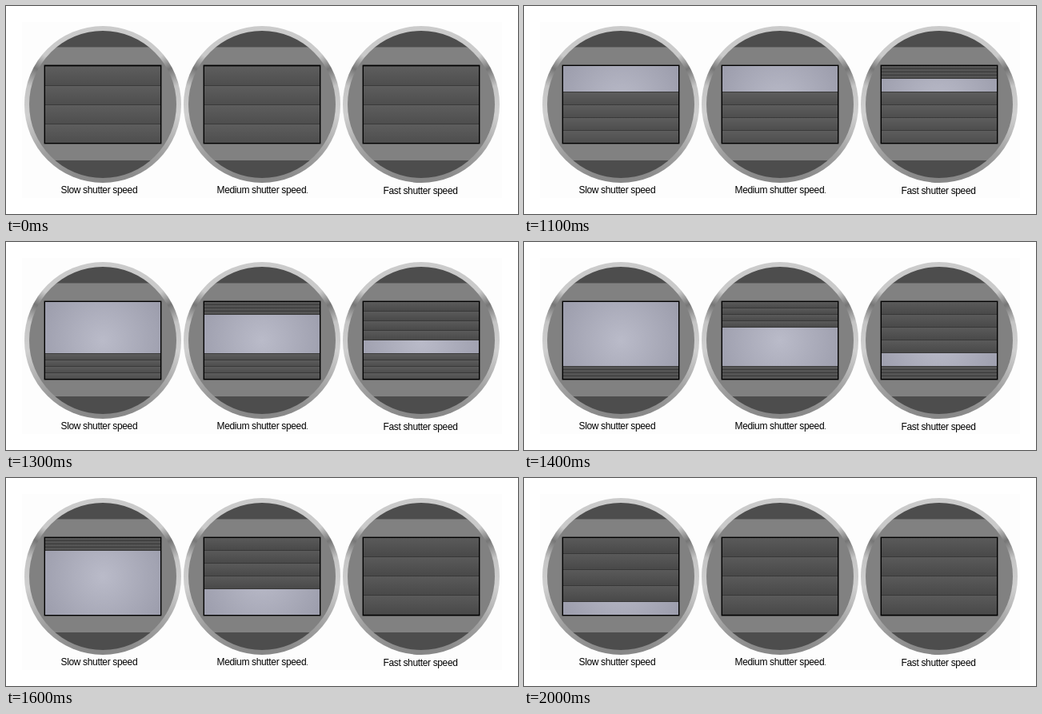
Animation of 640 by 260 pixels, one loop 2.1 s. Source, as an HTML page:

```html
<!DOCTYPE html>
<html lang="en">
<head>
<meta charset="utf-8">
<title>Shutter speeds</title>
<style>
  html, body { margin: 0; width: 100%; height: 100%; overflow: hidden; background: #fff; }
  div { position: absolute; }
  .stage { left: 0; top: 0; width: 640px; height: 260px; overflow: hidden; background: #fff; }
  .paper { left: 20px; top: 20px; width: 600px; height: 220px; background: #fdfdfd; }

  .barrel {
    top: 25px; width: 196px; height: 196px; border-radius: 50%;
    background: conic-gradient(#cbcbcb 0deg, #cacaca 50deg, #767676 62deg, #c4c4c4 76deg,
      #cfcfcf 98deg, #a0a0a0 130deg, #8a8a8a 160deg, #868686 180deg, #8a8a8a 200deg,
      #a0a0a0 230deg, #cfcfcf 262deg, #c4c4c4 284deg, #767676 298deg, #cacaca 310deg, #cbcbcb 360deg);
  }
  .body {
    left: 6px; top: 6px; width: 184px; height: 184px; border-radius: 50%;
    background: linear-gradient(#4d4d4d 20px, #6a6a6a 20px 21px, #818181 21px 162px, #4d4d4d 162px);
  }
  .gate {
    left: 26px; top: 50px; width: 144px; height: 96px;
    box-shadow: 0 0 0 1.4px #000;
    background: radial-gradient(circle, #babbc9, #9b9cab 88px);
  }

  /* each curtain is four slats that fold together */
  .first, .second { left: 0; width: 100%; background-size: 100% 25%; }
  .first {
    bottom: 0; height: 96px;
    background-image: linear-gradient(#3a3a3a 1px, transparent 1px), linear-gradient(#5e5e5e, #4e4e4e);
    animation: open 2.1s infinite;
  }
  .second {
    top: 0; height: 0;
    background-image: linear-gradient(transparent calc(100% - 1px), #383838 calc(100% - 1px)), linear-gradient(#5a5a5a, #484848);
    animation: 2.1s infinite;
  }
  .slow .second { animation-name: close-slow; }
  .medium .second { animation-name: close-medium; }
  .fast .second { animation-name: close-fast; }

  @keyframes open {
    0% { height: 96px; }
    47.61% { height: 96px; animation-timing-function: steps(6, start); }
    76.18%, 100% { height: 0; }
  }
  @keyframes close-slow {
    0% { height: 0; }
    76.18% { height: 0; animation-timing-function: steps(5, start); }
    100% { height: 80px; }
  }
  @keyframes close-medium {
    0% { height: 0; }
    61.9% { height: 0; animation-timing-function: steps(6, start); }
    90.47%, 100% { height: 96px; }
  }
  @keyframes close-fast {
    0% { height: 0; }
    52.38% { height: 0; animation-timing-function: steps(6, start); }
    80.95%, 100% { height: 96px; }
  }

  .slow { left: 23px; }
  .medium { left: 222px; }
  .fast { left: 421px; }
  .label {
    top: 223px; color: #000; white-space: nowrap;
    font: 12px/14px "Liberation Sans", Arial, sans-serif; letter-spacing: -.35px;
  }
  .dot { left: 376px; top: 233px; width: 1px; height: 1px; background: #444; }
</style>
</head>
<body>
<div class="stage">
  <div class="paper"></div>
  <div class="barrel slow"><div class="body"></div><div class="gate"><div class="first"></div><div class="second"></div></div></div>
  <div class="barrel medium"><div class="body"></div><div class="gate"><div class="first"></div><div class="second"></div></div></div>
  <div class="barrel fast"><div class="body"></div><div class="gate"><div class="first"></div><div class="second"></div></div></div>
  <div class="label" style="left:68.5px">Slow shutter speed</div>
  <div class="label" style="left:263.5px">Medium shutter speed</div>
  <div class="label" style="left:471.5px;top:224px">Fast shutter speed</div>
  <div class="dot"></div>
</div>
</body>
</html>
```
